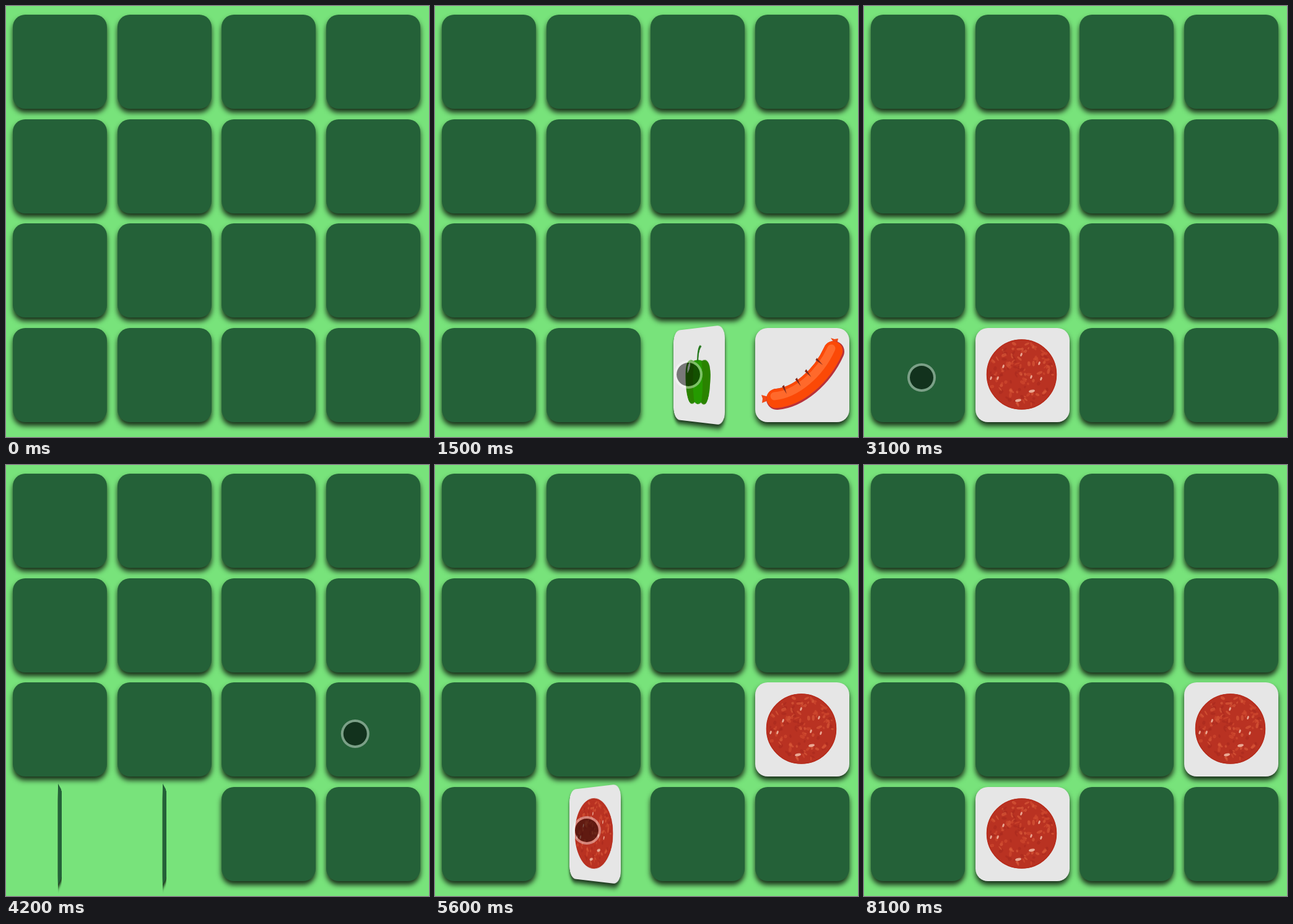
Write an HTML page that moves like this. It is 683 px wide and 696 px high and loops after 8.2 s.

```html
<!DOCTYPE html>
<html lang="en">
<head>
<meta charset="utf-8">
<style>
html, body { margin: 0; width: 100%; height: 100%; overflow: hidden; background: #78e37b; }
.card {
  position: absolute; width: 152px; height: 152px; border-radius: 20px;
  background: #246138; box-shadow: 0 6px 8px rgba(0, 0, 0, .8);
}
.card svg { display: block; visibility: hidden; }
.open { background: #e6e6e6; }
.open svg { visibility: visible; }
#pointer {
  position: absolute; left: -23px; top: -23px; width: 46px; height: 46px;
  box-sizing: border-box; border: 4px solid rgba(255, 255, 255, .4); border-radius: 50%;
  background: rgba(0, 0, 0, .48) padding-box;
}
</style>
</head>
<body>
<script>
const LOOP = 8200, STEP = 100, FLIP = 500;

let seed = 7;
const random = () => (seed = seed * 16807 % 2147483647) / 2147483647;

const fleck = (x, y, rx, ry, turn, fill, alpha = 1) =>
  `<ellipse rx="${rx}" ry="${ry}" fill="${fill}" opacity="${alpha}"
    transform="translate(${x} ${y}) rotate(${turn})"/>`;

function salami() {
  let art = '<circle cx="74.5" cy="75" r="56.5" fill="#b93222"/>';
  for (let i = 0; i < 130; i++) {
    const r = 52 * Math.sqrt(random()), a = random() * 2 * Math.PI;
    art += fleck(74.5 + r * Math.cos(a), 75 + r * Math.sin(a), 2 + random() * 3, 1 + random() * 1.8,
      random() * 180, ['#d95a3b', '#cf4a30', '#a92a1f'][i % 3], .65);
  }
  const fat = [[45, 62], [103, 57], [74, 43], [36, 81], [91, 102], [69, 117], [106, 82], [25, 81], [90, 79]];
  fat.forEach(([x, y], i) => {
    const big = i === 4 || i === 5;
    art += fleck(x, y, big ? 5 : 3, big ? 2.2 : 1.5, big ? -12 : 110, '#f0b5a0', .9);
  });
  return art + '<circle cx="74.5" cy="75" r="56" fill="none" stroke="#b62c1c" stroke-width="1.5"/>';
}

function sausage() {
  const body = (color, width, shift = '') =>
    `<path d="M35 115C70 112 108 80 127 38" fill="none" stroke="${color}" stroke-width="${width}"
      stroke-linecap="round" ${shift && `transform="translate(${shift})"`}/>`;
  const cuts = [[104, 55], [86, 74], [70, 88], [48, 100]].map(([x, y], i) =>
    `<path d="M-8-2L7 0L-7 2Z" fill="#7f291c" transform="translate(${x} ${y}) rotate(${42 + i * 8})"/>`);
  return '<path d="M128 25L122 16L128 18L134 17L132 26ZM21 111L10 108L12 114L11 121L21 117Z" fill="#f04a17"/>' +
    body('#b8323a', 34) + body('#fb4907', 31, '-1.2 -1.2') + body('#ff692b', 13, '-4 -5') + cuts.join('');
}

const pepper = () =>
  `<path d="M63 53C47 48 39 56 39 77C39 101 46 123 58 123Q64 123 67 120Q76 126 86 120Q91 124 98 122
    C108 119 113 96 113 75C113 56 103 49 89 53Q77 50 63 53Z" fill="#2a8300"/>
  <path d="M66 53Q76 50 87 53C92 70 92 102 87 119Q76 125 66 119C61 102 61 70 66 53Z" fill="#259a00"/>
  <path d="M74 54C75 43 76 31 83 28L88 30C81 34 79 42 78 54Z" fill="#25781d"/>` +
  fleck(49, 63, 3.2, 8, 24, '#eaffea') + fleck(46, 70, 1.3, 2.5, 24, '#eaffea');

// Cards by index: picture and the times at which each one turns over
const deck = {
  11: { art: salami, turns: [4370] },
  12: { art: pepper, turns: [3150, 4050] },
  13: { art: salami, turns: [2500, 4050, 5400] },
  14: { art: pepper, turns: [1300, 2300] },
  15: { art: sausage, turns: [865, 2300] }
};

const cards = Array.from({ length: 16 }, (_, i) => {
  const el = document.createElement('div'), { art, turns = [] } = deck[i] || {};
  el.className = 'card';
  el.style.left = Math.round(11 + 168.67 * (i % 4)) + 'px';
  el.style.top = Math.round(14 + 168.67 * (i >> 2)) + 'px';
  seed = 7;
  if (art) el.innerHTML = `<svg width="152" height="152">${art()}</svg>`;
  document.body.append(el);
  return { el, turns };
});

const pointer = document.createElement('div');
pointer.id = 'pointer';
document.body.append(pointer);

// Pointer stops: time, x, y
const path = [
  [400, 600, 600], [800, 600, 600], [1000, 409, 595], [1950, 409, 595], [2200, 225, 596],
  [2700, 225, 596], [3000, 93, 600], [3700, 93, 600], [4250, 575, 430], [4550, 575, 430],
  [4900, 461, 442], [5250, 245, 590], [5700, 245, 590], [6200, 250, 730]
];

const clamp = v => Math.min(1, Math.max(0, v));
const smooth = v => v * v * (3 - 2 * v);

// cubic-bezier(.25, .1, .25, 1)
function ease(v) {
  const bezier = (a, b, s) => 3 * a * s * (1 - s) ** 2 + 3 * b * s * s * (1 - s) + s ** 3;
  let low = 0, high = 1;
  for (let i = 0; i < 20; i++) {
    const mid = (low + high) / 2;
    if (bezier(.25, .25, mid) < v) low = mid; else high = mid;
  }
  return bezier(.1, 1, low);
}

function place(t) {
  let i = 0;
  while (i < path.length - 2 && t > path[i + 1][0]) i++;
  const [t0, x0, y0] = path[i], [t1, x1, y1] = path[i + 1];
  const k = smooth(clamp((t - t0) / (t1 - t0)));
  return [x0 + (x1 - x0) * k, y0 + (y1 - y0) * k];
}

function draw(t) {
  for (const { el, turns } of cards) {
    let angle = 0;
    turns.forEach((start, i) => {
      if (t > start) angle += (i % 2 ? -180 : 180) * ease(clamp((t - start) / FLIP));
    });
    const open = angle > 90;
    el.classList.toggle('open', open);
    const tilt = open ? angle - 180 : angle;
    el.style.transform = Math.abs(tilt) > .05 ? `perspective(1000px) rotateY(${tilt}deg)` : 'none';
  }
  const [x, y] = place(t);
  pointer.style.transform = `translate(${x}px, ${y}px)`;
  pointer.style.opacity = t < 6200 ? clamp((t - 300) / 200) : 0;
}

const begin = performance.now();
function tick() {
  const t = (performance.now() - begin) % LOOP;
  draw(Math.floor(t / STEP) * STEP);
  requestAnimationFrame(tick);
}
tick();
</script>
</body>
</html>
```
